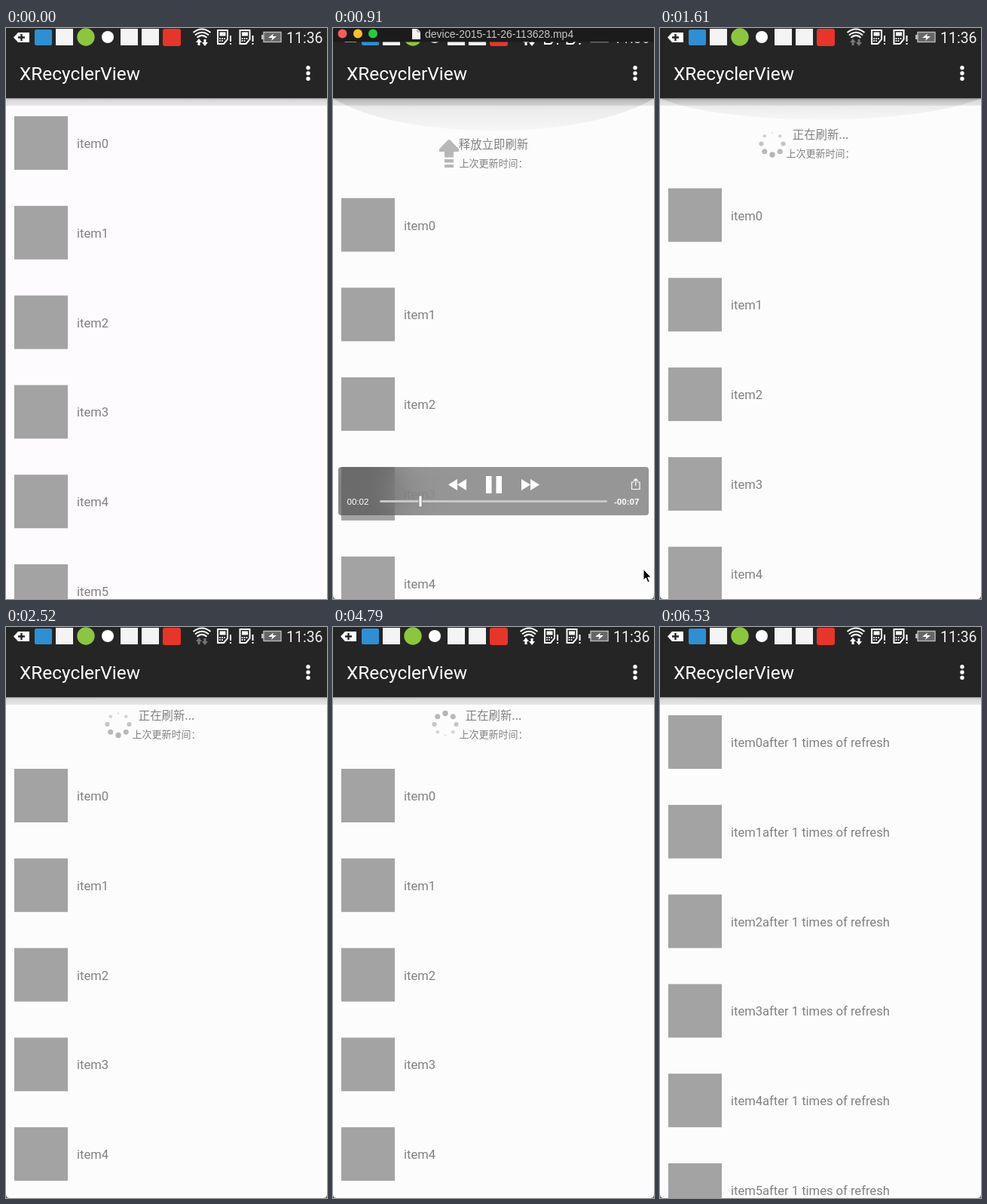
An HTML page that plays this animation: 426x757 px, repeating every 6.59 s.

```html
<!DOCTYPE html>
<html lang="zh-CN">
<head>
<meta charset="utf-8">
<title>Pull to refresh</title>
<style>
  html, body { margin: 0; width: 100%; height: 100%; overflow: hidden; background: #fcfcfc; }
  svg { position: absolute; left: 0; top: 0; display: block; }
  text { font-family: Roboto, sans-serif; white-space: pre; }
  .item { font-size: 16.57px; fill: #808080; }
  .cjk { font-family: "Noto Sans CJK SC", "Noto Sans CJK", sans-serif; text-anchor: middle; fill: #808080; }
  #updated { font-family: "Noto Sans CJK TC", "Noto Sans CJK", sans-serif; }
  .mac { font-family: "Liberation Sans", Arial, sans-serif; }
  #player {
    position: absolute; left: 7px; top: 582px; width: 412px; height: 64px; border-radius: 4px;
    background: rgba(50, 48, 50, .5);
    -webkit-backdrop-filter: blur(24px); backdrop-filter: blur(24px);
  }
</style>
</head>
<body>
<svg id="stage" width="426" height="757" viewBox="0 0 426 757">
  <defs>
    <linearGradient id="glowFill" x1="0" y1="0" x2="0" y2="1">
      <stop offset="0" stop-opacity=".15"/>
      <stop offset=".3" stop-opacity=".07"/>
      <stop offset="1" stop-opacity=".022"/>
    </linearGradient>
    <linearGradient id="shadowFill" x1="0" y1="0" x2="0" y2="1">
      <stop offset="0" stop-opacity=".4"/>
      <stop offset=".22" stop-opacity=".15"/>
      <stop offset="1" stop-opacity=".08"/>
    </linearGradient>
    <g id="sheet" fill="none" stroke="#fff" stroke-width="2">
      <path d="M1 3H14V15L9 21H1Z"/>
      <path d="M3.5 8H11.500" stroke-width="5"/>
      <path d="M4 13V19M7 13V19M10 13V16" stroke-width="1.6" stroke-dasharray="2 1"/>
      <path d="M18 10V18M18 20V22"/>
    </g>
  </defs>

  <rect id="page" width="426" height="757"/>
  <g id="list"></g>

  <g id="header">
    <text id="status" class="cjk" x="213" y="51.5" font-size="15.4"></text>
    <text id="updated" class="cjk" x="213" y="75.7" font-size="13"></text>
    <g id="arrow" fill="#b7b7b7">
      <path d="M-1.5 -18Q0 -19 1.5 -18L13 -6V-2.5H6V5H-6V-2.5H-13V-6Z"/>
      <path d="M-6 7.5H6V12H-6ZM-6 14.5H6V18.5H-6Z"/>
    </g>
    <g id="spinner" fill="#b5b5b5" transform="translate(149 58)"></g>
  </g>

  <path id="glow" d="M0 0C90 1.333 336 1.333 426 0Z" fill="url(#glowFill)"/>
  <rect y="93" width="426" height="10" fill="url(#shadowFill)"/>

  <rect width="426" height="93" fill="#262526"/>
  <text x="18" y="69" font-size="24.4" fill="#fff">XRecyclerView</text>
  <g fill="#fff">
    <circle cx="401" cy="52.7" r="2.7"/><circle cx="401" cy="60" r="2.7"/><circle cx="401" cy="67.3" r="2.7"/>
  </g>

  <g id="statusBar">
    <path d="M10 12.5L16 6H31V19H16Z" fill="#fff"/>
    <path d="M20.5 8V17M16 12.5H25" stroke="#262526" stroke-width="2.4"/>
    <rect x="38" y="2" width="23" height="21" rx="2" fill="#2f8fd3"/>
    <rect x="66" y="1" width="23" height="22" fill="#f4f4f4"/>
    <circle cx="106" cy="12" r="11.7" fill="#8cc63f"/>
    <circle cx="135" cy="12" r="8" fill="#fff"/>
    <rect x="152" y="1" width="23" height="22" fill="#f4f4f4"/>
    <rect x="180" y="1" width="23" height="22" fill="#f4f4f4"/>
    <rect x="208" y="1" width="24" height="23" rx="3" fill="#e8352b"/>
    <path d="M248.5 6Q260 -3 271.5 6M251 9.5Q260 2 269 9.5M253.5 12.7Q260 7 266.5 12.7"
      fill="none" stroke="#fff" stroke-width="2"/>
    <path id="traffic" d="M256 14L260 19H257.5V23H254.5V19H252ZM264 24L268 19H265.5V15H262.5V19H260Z"/>
    <use href="#sheet" x="280"/>
    <use href="#sheet" x="309.5"/>
    <rect x="342" y="5.5" width="23" height="13" fill="#666" stroke="#bbb" stroke-width="1.4"/>
    <rect x="339" y="9" width="3" height="6" fill="#bbb"/>
    <path d="M348 13L355 7.5L354 11H359L352 17L353.5 13Z" fill="#fff"/>
    <text x="372" y="19.5" font-size="19.5" fill="#eee">11:36</text>
  </g>

  <g id="chrome">
    <rect width="426" height="18.5" fill="#1c1b1c"/>
    <circle cx="12.5" cy="7.5" r="6" fill="#fc5b57"/>
    <circle cx="33" cy="7.5" r="6" fill="#fdbe2f"/>
    <circle cx="53" cy="7.5" r="6" fill="#2bc840"/>
    <path d="M105 1H112L116 5V15H105Z" fill="#f2f2f2"/>
    <path d="M112 1V5H116" fill="none" stroke="#888"/>
    <text class="mac" x="122" y="13" font-size="14" fill="#c6c6c6">device-2015-11-26-113628.mp4</text>
    <path d="M412 717.5V732L415.3 729L417.8 735L420.2 734L417.7 728.2H422Z" fill="#000" stroke="#fff"/>
  </g>
  <path id="corners" d="M0 757V752Q0 757 5 757ZM426 757V752Q426 757 421 757Z" fill="#666"/>
</svg>

<div id="player">
  <svg width="412" height="64" viewBox="7 582 412 64">
    <g fill="#fff">
      <path d="M165 598V613L153 605.5ZM177 598V613L165 605.5Z"/>
      <path d="M250 598V613L262 605.5ZM262 598V613L274 605.5Z"/>
      <path d="M203 594H210.5V617H203ZM216.5 594H224V617H216.5Z"/>
      <text class="mac" x="18.5" y="632" font-size="11.6">00:02</text>
      <text class="mac" x="373" y="632" font-size="11.6" font-weight="700">-00:07</text>
    </g>
    <path d="M399.5 602H396.5V611.5H407V602H404M401.7 607V598M398.7 600.5L401.7 597.5L404.7 600.5"
      fill="none" stroke="#fff" stroke-width="1.2"/>
    <rect x="62" y="626" width="302" height="3" rx="1.5" fill="#c8c6c8"/>
    <rect x="114" y="620" width="4" height="15" fill="#fff" stroke="#777" stroke-width=".8"/>
  </svg>
</div>

<script>
const LOOP = 6590;
const PULL = 390, PULLED = 900, RELEASE = 1486, DONE = 5368, RESET = 5850, SETTLE = 312;
const PEAK = 108.5, REST = 71, GLOW = 43;
const SPIN = 908, SPIN_START = 2293;

const $ = id => document.getElementById(id);
const clamp = v => Math.min(1, Math.max(0, v));
const progress = (t, start, length) => clamp((t - start) / length);
const easeOut = p => 1 - (1 - p) ** 2;
const easeInOut = p => (1 - Math.cos(Math.PI * p)) / 2;
const mix = (a, b, p) => a + (b - a) * p;

function add(parent, tag, attrs) {
  const el = document.createElementNS('http://www.w3.org/2000/svg', tag);
  for (const name in attrs) el.setAttribute(name, attrs[name]);
  return parent.appendChild(el);
}

const labels = Array.from({ length: 6 }, (_, i) => {
  const y = 117 + i * 118.8;
  add($('list'), 'rect', { x: 11, y, width: 71, height: 71, fill: '#a3a3a3' });
  return add($('list'), 'text', { x: 94, y: y + 42, class: 'item' });
});

const dots = Array.from({ length: 8 }, (_, i) => add($('spinner'), 'circle', {
  cx: 14.5 * Math.cos(i * Math.PI / 4),
  cy: 14.5 * Math.sin(i * Math.PI / 4)
}));

function setText(el, value) {
  if (el.textContent !== value) el.textContent = value;
}

function listOffset(t) {
  if (t < RELEASE) return PEAK * easeOut(progress(t, PULL, PULLED - PULL));
  if (t < RESET) return mix(PEAK, REST, easeInOut(progress(t, RELEASE, SETTLE)));
  return REST * (1 - easeInOut(progress(t, RESET, SETTLE)));
}

// Moment the pull passes the height that arms the refresh.
const ARMED = PULL + (PULLED - PULL) * (1 - Math.sqrt(1 - REST / PEAK));

function statusText(t) {
  if (t < ARMED || t >= RESET) return '下拉刷新';
  if (t < RELEASE) return '释放立即刷新';
  return t < DONE ? '正在刷新...' : '刷新完成';
}

function drawSpinner(t) {
  dots.forEach((dot, i) => {
    const phase = (t - SPIN_START) / SPIN - i / 8;
    const level = Math.abs(Math.cos(Math.PI * phase));
    dot.setAttribute('r', 3.7 * (0.4 + 0.6 * level));
    dot.setAttribute('opacity', 0.3 + 0.7 * level);
  });
}

function render(t) {
  const offset = listOffset(t);
  const done = t >= DONE;
  const refreshing = t >= RELEASE && !done;

  $('page').setAttribute('fill', t < PULL ? '#fdfbfe' : '#fcfcfc');
  $('list').setAttribute('transform', `translate(0 ${offset})`);
  $('header').setAttribute('transform', `translate(0 ${offset})`);
  $('header').style.display = offset > 0 ? '' : 'none';
  labels.forEach((el, i) => setText(el, `item${i}` + (done ? 'after 1 times of refresh' : '')));

  setText($('status'), statusText(t));
  setText($('updated'), '上次更新时间：' + (done ? '刚刚' : ''));

  const turn = t < RELEASE ? 180 - 180 * progress(t, ARMED, 180) : 180;
  $('arrow').setAttribute('transform', `translate(${done ? 141 : 154} 58) rotate(${turn})`);
  $('arrow').style.display = t < RELEASE || t >= RESET ? '' : 'none';
  $('spinner').style.display = refreshing ? '' : 'none';
  if (refreshing) drawSpinner(t);

  const glow = t < RELEASE ? offset / PEAK : t < RESET ? 1 - progress(t, RELEASE, 370) : 0;
  $('glow').setAttribute('transform', `translate(0 93) scale(1 ${Math.max(0.001, glow * GLOW)})`);
  $('glow').setAttribute('opacity', clamp(glow * 1.5));

  const chrome = progress(t, PULL, 120) * (1 - progress(t, 1150, 300));
  for (const id of ['chrome', 'player']) {
    $(id).style.opacity = chrome;
    $(id).style.display = chrome > 0 ? '' : 'none';
  }
  $('corners').style.display = t < PULL ? 'none' : '';
  $('traffic').setAttribute('fill', t > 1080 && t < 2850 ? '#777' : '#fff');
}

const start = performance.now();
function tick() {
  render((performance.now() - start) % LOOP);
  requestAnimationFrame(tick);
}
tick();
</script>
</body>
</html>
```
